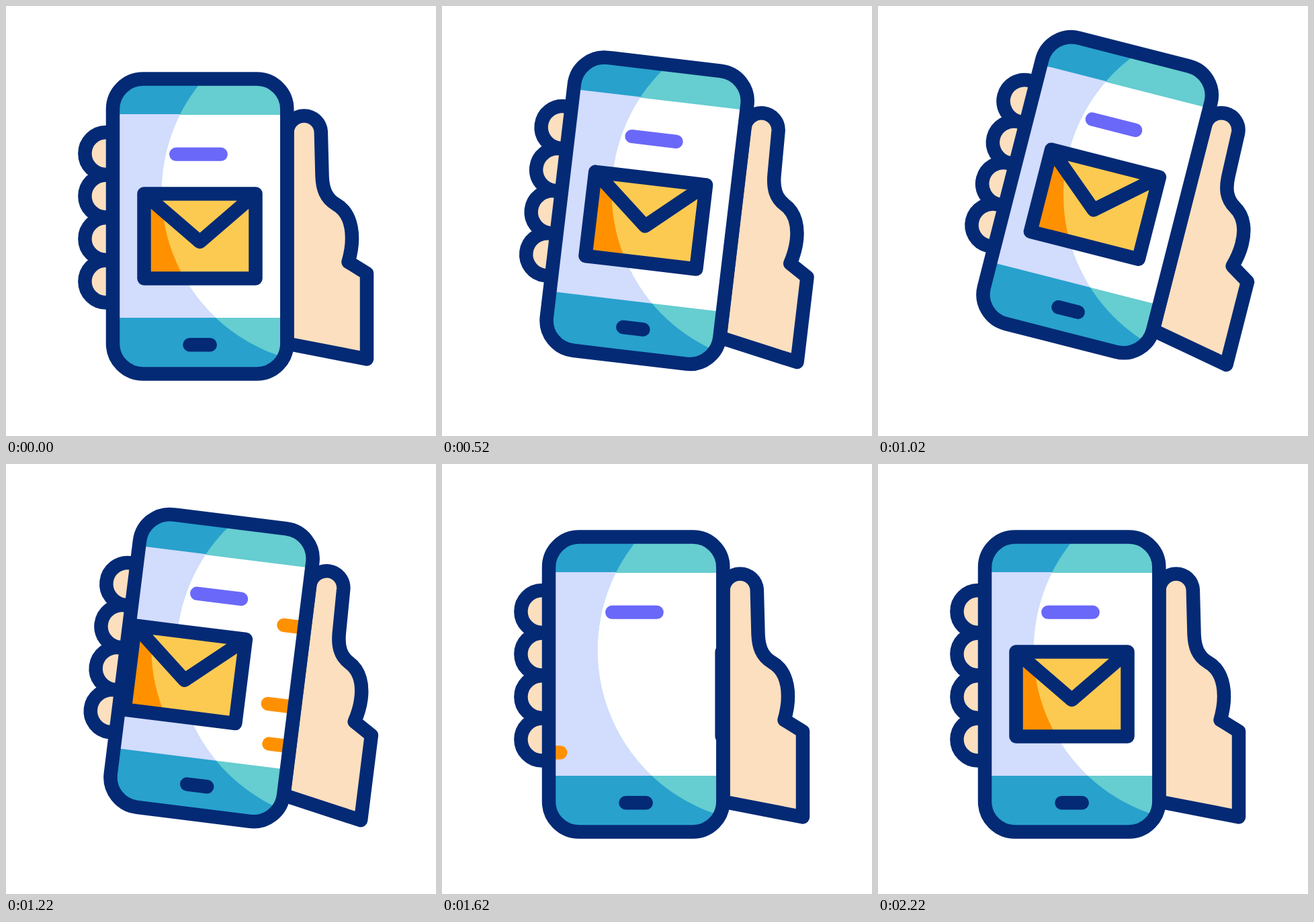
Recreate the animation shown at these times as an HTML page. Size 640 by 640 pixels, loop 2.42 s.

```html
<!DOCTYPE html>
<html lang="en">
<head>
<meta charset="utf-8">
<title>Mail on a phone</title>
<style>
  html, body { margin: 0; height: 100%; overflow: hidden; background: #fff; }
  svg { display: block; width: 100vw; height: 100vh; }
  .ink { stroke: #042a75; stroke-width: 20.5; stroke-linecap: round; stroke-linejoin: round; fill: none; }
  .skin { fill: #fcdfbe; }
  .bar { stroke-width: 20.3; stroke-linecap: round; }
</style>
</head>
<body>
<svg viewBox="0 0 640 640">
  <defs>
    <clipPath id="disc"><circle cx="488.5" cy="277" r="257"/></clipPath>
    <clipPath id="screen"><rect x="159" y="108.5" width="259.5" height="439" rx="45"/></clipPath>
  </defs>
  <g id="hand">
    <g id="fingers" class="ink skin"></g>
    <path class="ink skin" d="M418.5 187A25.2 25.2 0 0 1 468.8 187L470.5 252C471 272 476 286 491 295C509 305 515 326 515 346C515 359 513 369 509.5 381L537 398V525.5L418.5 502.5Z"/>
    <g clip-path="url(#screen)">
      <path fill="#28a1cd" d="M159 108h260v440h-260z"/>
      <path fill="#d2dcfd" d="M159 161h260v303h-260z"/>
      <g clip-path="url(#disc)">
        <path fill="#66cdd0" d="M159 108h260v440h-260z"/>
        <path fill="#fff" d="M159 162h260v302h-260z"/>
      </g>
      <path class="bar" stroke="#6a68f9" d="M253.2 220.7H319.7"/>
      <path id="streaks" class="bar" stroke="#ff9100" d="M275.3 251.5H326M266.3 370.5H314.7M275.3 429.5H344.3"/>
      <g id="mail">
        <path id="body" fill="#ff9100" d="M205.5 279.5h166v126h-166z"/>
        <path fill="#fdca51" clip-path="url(#disc)" d="M205.5 279.5h166v126h-166z"/>
        <path fill="#fdca51" d="M205.5 279.5h166L288.5 351z"/>
        <path class="ink" d="M205.5 279.5h166v126h-166zL288.5 351L371.5 279.5"/>
      </g>
    </g>
    <path class="ink" d="M273.5 504.2H303.7"/>
    <rect class="ink" x="159" y="108.5" width="259.3" height="439" rx="45"/>
  </g>
</svg>
<script>
  const LOOP = 2420, STEP = 20;
  const $ = id => document.getElementById(id);
  const span = (f, from, to) => Math.min(1, Math.max(0, (f - from) / (to - from)));
  const smooth = t => t * t * (3 - 2 * t);
  const easeIn = t => t * t * (1.9 - 0.9 * t);
  const slide = (id, x) => $(id).setAttribute('transform', `translate(${x} 0)`);

  $('fingers').innerHTML = [0, 1, 2, 3]
    .map(i => `<circle class="skin" cx="149" cy="${219.5 + 63.5 * i}" r="31.6"/>`).join('');

  function draw(now) {
    const f = Math.floor(now % LOOP / STEP);

    // tilt up gently, drop back faster
    const tilt = 15 * (smooth(span(f, 10, 44.3)) - easeIn(span(f, 47.5, 69)));
    $('hand').setAttribute('transform', `rotate(${tilt} 494 456)`);

    // mail flies out to the left and returns from the right
    slide('mail', f < 75 ? -220 * smooth(span(f, 56, 75)) : 228 * (1 - smooth(span(f, 75, 111))));
    slide('streaks', f > 50 && f < 90 ? 14 * (69 - f) : 400);
  }

  const start = performance.now();
  function tick() {
    draw(performance.now() - start);
    requestAnimationFrame(tick);
  }
  draw(0);
  requestAnimationFrame(tick);
</script>
</body>
</html>
```
